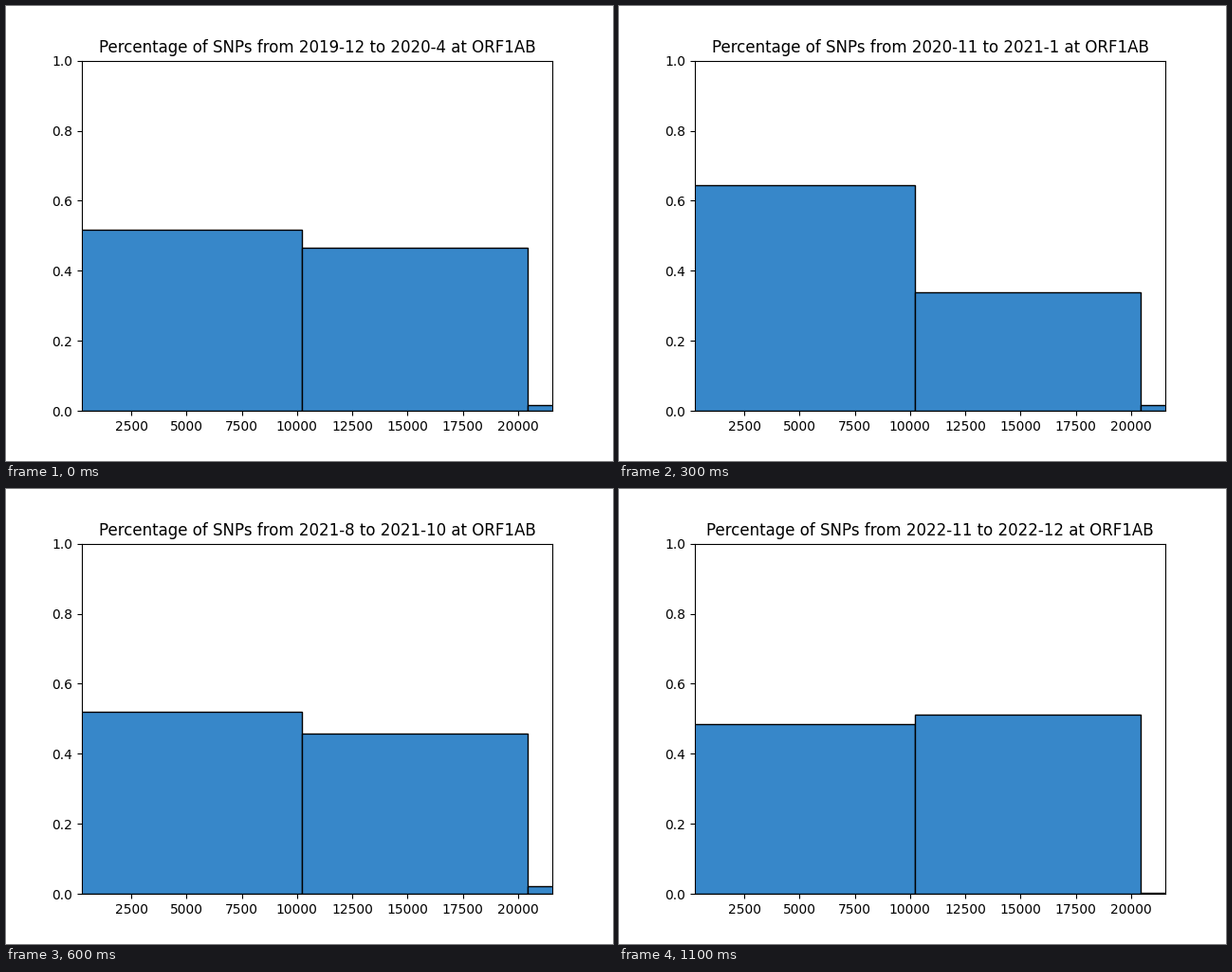
A matplotlib script that plays this animation: 640 by 480 pixels, repeating every 1.2 s.

```python
import numpy as np
import matplotlib.pyplot as plt
from matplotlib.animation import FuncAnimation

FRAMES, INTERVAL = 12, 100
GENE_START, GENE_END, BIN = 266, 21555, 10220


def month(n):
    """Label of the n-th month counted from 2020-1."""
    return f"{2020 + n // 12}-{n % 12 + 1}"


def period(step):
    first = -1 if step == 0 else 3 * step + 1
    last = min(3 * step + 3, 35)
    return f"{month(first)} to {month(last)}"


def shares(step):
    """Share of SNPs in each bin; the three add up to one."""
    first = np.interp(step, [0, 2, 4, 6, 8, 10, 11],
                      [0.5173, 0.7094, 0.5769, 0.52, 0.5308, 0.5065, 0.4848])
    last = np.interp(step, [4, 6, 8], [0.0168, 0.0222, 0.0032])
    return first, 1 - first - last, last


fig, ax = plt.subplots(figsize=(6.4, 4.8), dpi=100)
bars = ax.bar(BIN * np.arange(3), shares(0), width=BIN, align="edge",
              color="#3787c9", edgecolor="black", linewidth=1)
ax.set_xlim(GENE_START, GENE_END)
ax.set_ylim(0, 1)
title = ax.set_title("")


def update(step):
    for bar, share in zip(bars, shares(step)):
        bar.set_height(share)
    title.set_text(f"Percentage of SNPs from {period(step)} at ORF1AB")
    return [*bars, title]


anim = FuncAnimation(fig, update, frames=FRAMES, interval=INTERVAL,
                     repeat=True, repeat_delay=0)
plt.show()
```
